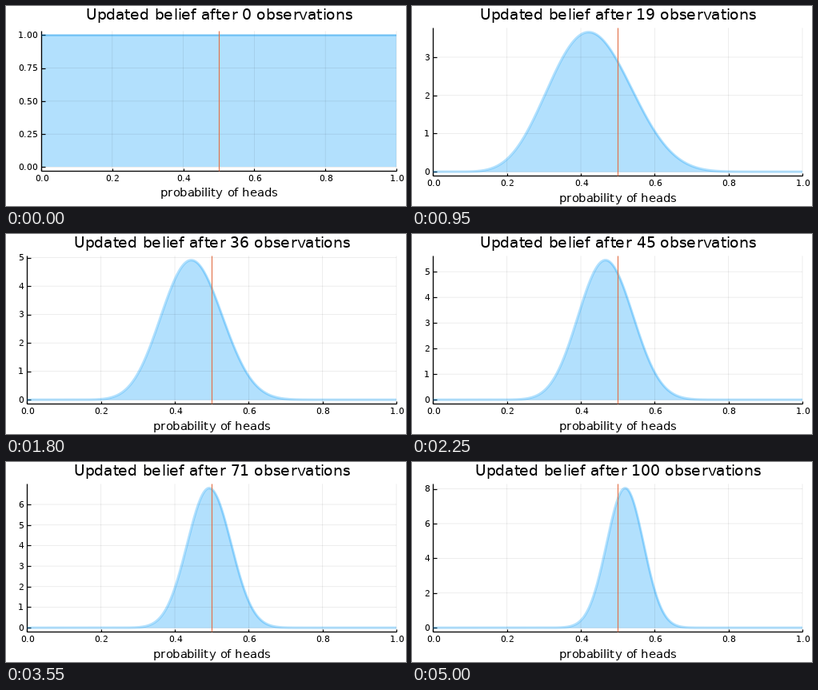
Animation, 500 px wide and 250 px high, one loop 5050 ms. Source, as a matplotlib script:

```python
import math
from functools import lru_cache

import matplotlib.pyplot as plt
import numpy as np
from matplotlib.animation import FuncAnimation
from matplotlib.patches import Rectangle
from matplotlib.textpath import TextPath

W, H, DPI = 500, 250, 100
FLIPS = 100
RIGHT = 488
BLUE, ORANGE = "#009AFA", "#E26F46"
PX = 72 / DPI  # points per pixel
TITLE, GUIDE, TICK = 18.75, 14.73, 10.7  # text sizes in pixels

plt.rcParams["font.family"] = "DejaVu Sans"
plt.rcParams["text.hinting"] = "default"
fig = plt.figure(figsize=(W / DPI, H / DPI), dpi=DPI, facecolor="white")
ax = fig.add_axes([0, 0, 1, 1])

# Running number of heads, known at a few flips and even in between
KNOTS = [0, 11, 28, 45, 71, 88, 100]
HEADS = [0, 5, 11, 21, 35, 44, 52]
p = np.linspace(0, 1, 501)


def heads_after(n):
    return math.floor(np.interp(n, KNOTS, HEADS) + 0.5)


def beta_pdf(n, h):
    """Posterior density of a coin's bias under a uniform prior."""
    log_c = math.lgamma(n + 2) - math.lgamma(h + 1) - math.lgamma(n - h + 1)
    return math.exp(log_c) * p**h * (1 - p) ** (n - h)


def tick_step(top):
    """Tick spacing and number of decimals for an axis ending at top."""
    if top < 1.5:
        return 0.25, 2
    if top < 3:
        return 0.5, 1
    return (1, 0) if top < 7 else (2, 0)


@lru_cache(maxsize=None)
def advance(char, size):
    """Pen advance of one character, in whole pixels."""
    def end(s):
        return TextPath((0, 0), s, size=size).get_extents().x1

    return round(end(char + "|") - end("|"))


def label(x, y, text, size, align=0.5):
    """Set text on the pixel grid; align is the anchor's share of its width."""
    steps = [advance(c, size) for c in text]
    pen = round(x - align * sum(steps))
    for char, step in zip(text, steps):
        if char != " ":
            ax.text(pen, y, char, fontsize=size * PX, va="baseline")
        pen += step


def line(x, y, width, color="black", **kw):
    return ax.plot(x, y, color=color, lw=width * PX,
                   solid_capstyle="butt", **kw)[0]


def draw(n):
    ax.clear()
    ax.set_xlim(0, W)
    ax.set_ylim(H, 0)
    ax.axis("off")

    density = beta_pdf(n, heads_after(n))
    peak = density.max()
    step, digits = tick_step(1.03 * peak)
    left = {2: 44, 1: 36, 0: 26.4}[digits]
    top, bottom = (31.4, 206.4) if n == 0 else (27.4, 212.4)

    def sx(v):
        return left + (RIGHT - left) * v

    def sy(v):
        return bottom - (bottom - top) * (v / peak + 0.03) / 1.06

    xticks = np.arange(6) / 5
    yticks = np.arange(0, 1.03 * peak, step)

    for t in xticks:
        line([sx(t)] * 2, [top, bottom], 0.7, alpha=0.1, snap=False)
    for t in yticks:
        line([left, RIGHT], [sy(t)] * 2, 0.7, alpha=0.1, snap=False)

    line([left, left], [top, bottom], 1.3)
    line([left, RIGHT], [bottom, bottom], 1.3)
    for t in xticks:
        line([sx(t)] * 2, [bottom, bottom - 3.5], 1.2)
        label(sx(t), bottom + 12.6, f"{t:.1f}", TICK)
    for t in yticks:
        line([left, left + 5], [sy(t)] * 2, 1.2)
        label(left - 4.6, sy(t) + 3.8, f"{t:.{digits}f}", TICK, 1)

    frame = Rectangle((left, top), RIGHT - left, bottom - top,
                      transform=ax.transData)
    area = ax.fill_between(sx(p), sy(density), sy(0), color=BLUE,
                           alpha=0.3, lw=0)
    curve = line(sx(p), sy(density), 3, BLUE, alpha=0.3)
    for part in (area, curve):
        part.set_clip_path(frame)
    mid = sx(0.5)
    line([mid, mid], [top, bottom], 1.1, ORANGE)

    label(mid, 17.2, f"Updated belief after {n} observations", TITLE)
    label(mid, 238 if n == 0 else 244.6, "probability of heads", GUIDE)


anim = FuncAnimation(fig, draw, frames=FLIPS + 1, init_func=lambda: draw(0),
                     interval=50, repeat=True, repeat_delay=0)
plt.show()
```
